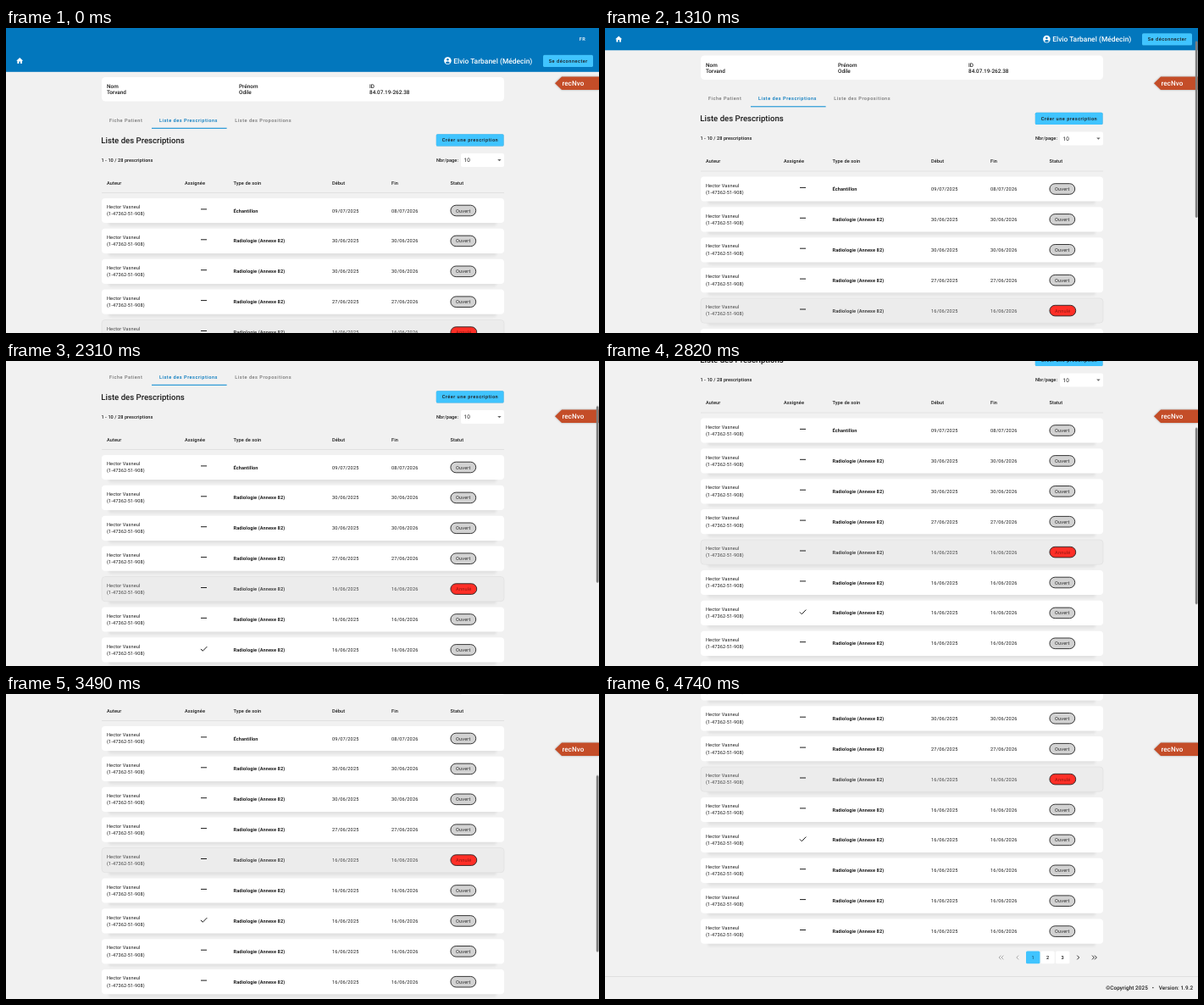
Recreate the animation shown at these times as an HTML page. Size 700 px wide and 360 px high, loop 4.76 s.

```html
<!DOCTYPE html>
<html lang="fr">
<head>
<meta charset="utf-8">
<title>Liste des Prescriptions</title>
<style>
@property --y { syntax: "<number>"; inherits: true; initial-value: 0; }
html, body { margin: 0; width: 100%; height: 100%; overflow: hidden; background: #f1f1f1; }
svg { display: block; width: 700px; height: 360px; animation: scroll 4760ms steps(1, start) infinite; }
text { font-family: Roboto, Arial, sans-serif; white-space: pre; text-rendering: geometricPrecision; }
#page { transform: translateY(calc(var(--y) * -1px)); }
#thumb { transform: translateY(calc(var(--y) * .586px)); animation: thumb 4760ms step-end infinite; }
#shadows { filter: blur(1.6px); }

/* --y is the scroll offset; it advances in small jumps, like a wheel scroll */
@keyframes scroll {
  0%, 19.957% { --y: 0; }
  20.378% { --y: .5; animation-timing-function: steps(9, start); }
  27.52% { --y: 23; }
  28.15% { --y: 25.5; animation-timing-function: steps(3, start); }
  30.25% { --y: 32; animation-timing-function: steps(7, start); }
  44.746% { --y: 75; animation-timing-function: steps(2, start); }
  48.529% { --y: 85; }
  50.84% { --y: 90; animation-timing-function: steps(4, start); }
  59.243% { --y: 129; }
  65.126% { --y: 133.5; animation-timing-function: steps(6, start); }
  73.319% { --y: 156; }
  74.579% { --y: 163; animation-timing-function: steps(3, start); }
  80.88% { --y: 228; animation-timing-function: steps(3, start); }
  86.91%, 100% { --y: 258.5; }
}
@keyframes thumb {
  0% { opacity: 0; }
  19.957% { opacity: 1; }
  99.579%, 100% { opacity: 0; }
}
</style>
</head>
<body>
<svg viewBox="0 0 700 360">
  <g id="page"></g>
  <g id="tag"></g>
  <rect id="thumb" x="696.8" y=".6" width="2.8" height="208.4" rx="1.4" fill="#7d7d7d"/>
</svg>
<script>
const BLUE = '#0277bd', SKY = '#40c4ff', INK = '#1c1c1c';
const DOCTOR = 'Hector Vasneul', DOCTOR_ID = '(1-47362-51-908)';
const out = [];

const rect = (x, y, w, h, fill, r = 0, more = '') =>
  out.push(`<rect x="${x}" y="${y}" width="${w}" height="${h}" rx="${r}" fill="${fill}" ${more}/>`);
const path = (d, fill, more = '') => out.push(`<path d="${d}" fill="${fill}" ${more}/>`);
const line = (d, color = INK, width = 1) =>
  path(d, 'none', `stroke="${color}" stroke-width="${width}"`);
const text = (x, y, str, { size = 5.6, weight = 400, gap = .1, fill = INK, anchor = 'start' } = {}) =>
  out.push(`<text x="${x}" y="${y}" font-size="${size}" font-weight="${weight}" ` +
    `letter-spacing="${gap}" fill="${fill}" text-anchor="${anchor}">${str}</text>`);
const flush = id => { document.getElementById(id).innerHTML = out.join(''); out.length = 0; };

function button(x, y, w, label) {
  rect(x, y, w, 14.4, SKY, 1.6, 'style="filter:drop-shadow(0 .7px .6px #0004)"');
  text(x + w / 2 + .25, y + 9.2, label, { weight: 500, gap: .5, anchor: 'middle' });
}

function header() {
  rect(0, 0, 700, 51.8, BLUE);
  text(676.7, 15, 'FR', { weight: 500, gap: .5, fill: '#fff' });
  path('M10 20v-6h4v6h5v-8h3L12 3 2 12h3v8z', '#fff', 'transform="translate(11.4 33.9) scale(.4)"');
  out.push('<circle cx="521.4" cy="38.6" r="4.3" fill="#fff"/>',
    `<circle cx="521.4" cy="37.2" r="1.3" fill="${BLUE}"/>`);
  path('M518.8 40.9q2.6-2.6 5.2 0q-2.6 2.6-5.2 0z', BLUE);
  text(528.2, 41.6, 'Elvio Tarbanel (Médecin)', { size: 8.4, weight: 500, gap: .03, fill: '#fff' });
  button(634, 31.7, 59, 'Se déconnecter');
}

function patient() {
  rect(113, 58, 475, 28.5, '#fff', 4.5);
  [[119, 'Nom', 'Torvand'], [275, 'Prénom', 'Odile'], [429, 'ID', '84.07.19-262.38']]
    .forEach(([x, label, value]) => {
      text(x, 71.2, label, { size: 6.4, weight: 500, gap: 0 });
      text(x, 78.2, value, { size: 6.4, weight: 500, gap: 0 });
    });
}

function tabs() {
  [[122, 'Fiche Patient'], [181, 'Liste des Prescriptions', BLUE], [270.3, 'Liste des Propositions']]
    .forEach(([x, label, fill = '#757575']) => text(x, 110.5, label, { weight: 500, gap: .5, fill }));
  rect(172, 117.8, 88.6, 1, '#0288d1');
}

function toolbar() {
  text(112.3, 135.6, 'Liste des Prescriptions', { size: 9.6, weight: 500, gap: 0 });
  button(507.8, 125.2, 79.8, 'Créer une prescription');
  text(112.4, 157.8, '1 - 10 / 28 prescriptions', { weight: 500, gap: .05 });
  text(508, 157.8, 'Nbr/page:', { weight: 500 });
  rect(537, 148, 51, 16, '#fff', 2);
  text(540.6, 158.2, '10', { size: 6.4 });
  path('M580.2 155h4.4l-2.2 2.3z', '#666');
}

function table() {
  const cols = { Auteur: 119, Assignée: 211, 'Type de soin': 268.5, Début: 385, Fin: 455, Statut: 524.5 };
  for (const name in cols) text(cols[name], 184.9, name, { weight: 500 });
  line('M113 194.5H588', '#dedede', .8);

  const mid = i => 215.5 + 35.9 * i;
  out.push('<g id="shadows" fill="#000" opacity=".06">');
  for (let i = 0; i < 10; i++) rect(121, mid(i) - 4, 458, 22, '#000', 3);
  out.push('</g>');
  for (let i = 0; i < 10; i++) row(mid(i), i);
}

function row(c, i) {
  const off = i === 4, fill = off ? '#444' : INK;
  const day = ['09/07/', '30/06/', '30/06/', '27/06/'][i] || '16/06/';
  rect(113, c - 14.6, 475, 29.2, off ? '#ececec' : '#fff', 4, off ? 'stroke="#dedede" stroke-width=".6"' : '');
  text(119, c - 2.4, DOCTOR, { fill });
  text(119, c + 5.8, DOCTOR_ID, { fill });
  if (i === 6) line(`M229.9 ${c - 1}l2.4 2.4l5-5.2`);
  else line(`M230 ${c - 1.6}h7`);
  text(268.5, c + 2, i ? 'Radiologie (Annexe 82)' : 'Échantillon', { weight: 700, fill });
  text(385, c + 2, day + '2025', { gap: .18, fill });
  text(455, c + 2, (i ? day : '08/07/') + '2026', { gap: .18, fill });
  const w = off ? 30.8 : 29.8;
  rect(524.9, c - 6.3, w, 12.6, off ? '#ff2f27' : '#d2d2d2', 6.3, 'stroke="#222" stroke-width=".9"');
  text(524.9 + w / 2, c + 2, off ? 'Annulé' : 'Ouvert',
    { gap: .2, anchor: 'middle', fill: off ? '#8f1813' : '#2a2a2a' });
}

function chevron(x, dir, color) {
  line(`M${x - dir * 1.2} 567.1l${dir * 2.4} 2.4l${-dir * 2.4} 2.4`, color, .9);
}

function footer() {
  [466.2, 469.2, 487].forEach(x => chevron(x, -1, '#a5a5a5'));
  [558.5, 576.2, 579.2].forEach(x => chevron(x, 1, INK));
  [497, 514.4, 532].forEach((x, i) => {
    rect(x, 562, 16.4, 14.8, i ? '#fff' : SKY, 1.6);
    text(x + 8.2, 571.5, i + 1, { weight: 500, anchor: 'middle', fill: i ? INK : '#1b5f80' });
  });
  line('M0 592H700', '#dedede', .9);
  const style = { size: 6.4, weight: 500, gap: .06 };
  text(591.2, 607.8, '©Copyright 2025', style);
  text(645.8, 607.8, '•', style);
  text(653.8, 607.8, 'Version: 1.9.2', style);
}

[header, patient, tabs, toolbar, table, footer].forEach(draw => draw());
flush('page');

path('M648 65.3L656 57.6H700V73H656z', '#c44d28', 'style="filter:drop-shadow(0 .8px .8px #0005)"');
text(656.4, 67.8, 'recNvo', { size: 8, weight: 500, gap: .1, fill: '#fff' });
flush('tag');
</script>
</body>
</html>
```
